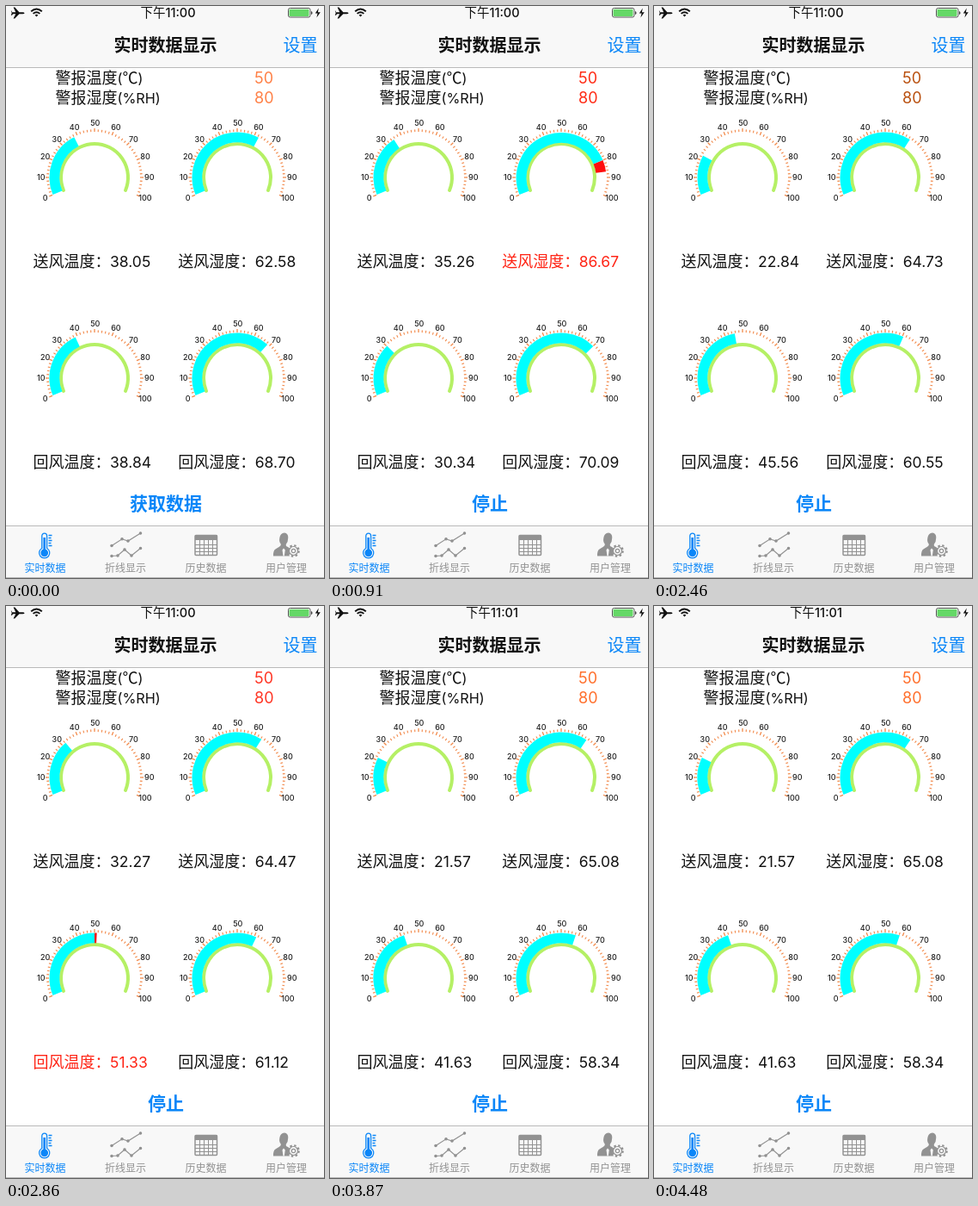
An HTML page for the animation above (4880 ms loop, 370 px wide and 664 px high).

```html
<!DOCTYPE html>
<html lang="zh-CN">
<head>
<meta charset="utf-8">
<title>实时数据显示</title>
<style>
  html, body { margin: 0; width: 100%; height: 100%; overflow: hidden; background: #fff; }
  svg { display: block; width: 370px; height: 664px; }
  text { font-family: Inter, "Noto Sans CJK SC", "Noto Sans CJK", sans-serif; fill: #111; }
  .body { font-size: 18px; }
  .num { font-size: 17.5px; }
  .unit { font-size: 16.2px; }
  .cjk { font-family: "Noto Sans CJK SC", "Noto Sans CJK", sans-serif; }
  .mid { text-anchor: middle; }
  .mark { font-size: 9px; font-weight: 500; fill: #222; text-anchor: middle; }
  .tab { font-size: 12px; fill: #929292; text-anchor: middle; }
  .blue { fill: #0a86f8; }
  .line { fill: none; stroke: #929292; }
</style>
</head>
<body>
<svg id="stage" viewBox="0 0 370 664">
  <rect width="370" height="664" fill="#fff"/>
  <rect width="370" height="71" fill="#f8f8f8"/>
  <rect y="604" width="370" height="60" fill="#f8f8f8"/>
  <path d="M0 71.5H370M0 603.5H370M0 663.5H370" stroke="#bababa"/>

  <!-- status bar -->
  <path d="M6.500 7.200h4.800L8.600 1.500h1.700l5.100 5.700h4q2 .1 2.200 1-.2.9-2.200 1h-4l-5.100 5.300H8.600l2.700-5.300H8.200l-1.300 1.600H5.800l.9-2.600-.9-2.500h1.100z" fill="#111"/>
  <g fill="none" stroke="#111" stroke-width="1.900">
    <path d="M29.200 6.200q6.300-5.600 12.600 0M31.600 8.900q3.900-3.500 7.800 0"/>
    <path d="M33.600 10.400q1.900-1.400 3.800 0L35.500 12.600z" fill="#111" stroke="none"/>
  </g>
  <text id="clock" class="mid" x="188.500" y="13" font-size="14.500" font-weight="500"></text>
  <rect x="328.500" y="2.500" width="25.500" height="10.500" rx="2" fill="#fff" stroke="#555"/>
  <rect x="329.500" y="3.700" width="23" height="8.200" rx="1" fill="#65d867"/>
  <path d="M355 6v4q1.600-.5 1.600-2T355 6z" fill="#444"/>
  <path d="M363.800 2.500l-4 6h2.800l-1.200 5 4.400-6.300h-2.900z" fill="#111"/>

  <text class="mid" x="185.500" y="53" font-size="20" font-weight="700">实时数据显示</text>
  <text class="blue mid" x="342.500" y="52.500" font-size="20">设置</text>

  <!-- alarm limits -->
  <text class="body" x="57.500" y="90">警报温度<tspan class="unit">(</tspan><tspan class="cjk">℃</tspan><tspan class="unit">)</tspan></text>
  <text class="body" x="57.500" y="113">警报湿度<tspan class="unit">(%RH)</tspan></text>
  <g id="limits">
    <text class="body" x="289" y="90">50</text>
    <text class="body" x="289" y="113">80</text>
  </g>

  <g id="gauges"></g>
  <text id="button" class="blue mid" x="186" y="584.500" font-size="21" font-weight="700"></text>

  <!-- tab icons -->
  <g fill="none" stroke="#0a86f8" stroke-width="1.300">
    <path d="M41.800 629.500v-14.500a2.900 2.900 0 0 1 5.800 0v14.500a6.100 6.100 0 1 1-5.800 0z"/>
    <path d="M44.700 617v16" stroke-width="2.600"/>
    <circle cx="44.700" cy="634.800" r="3.700" fill="#0a86f8"/>
    <path d="M49.500 614.500h4M49.500 617.500h3M49.500 620.500h4M49.500 623.500h3M49.500 626.500h4"/>
  </g>
  <g id="chart" class="line" stroke-width="1.200"></g>
  <rect class="line" x="220" y="614.500" width="25.500" height="23" rx="1" stroke-width="1.500"/>
  <rect x="220" y="614" width="25.500" height="6" fill="#929292"/>
  <path class="line" d="M220 625.500h25M220 629.500h25M220 633.500h25M225.500 620v17M230.500 620v17M235.500 620v17M240.500 620v17"/>
  <g fill="#929292">
    <path d="M324 611.500q4.300.6 4.300 5.500 0 5-2.600 8l.3 2q2.500 1 4.500 3-3 4-.5 8.500H311q-.2-6.500 2.500-8l4.500-2.700q2.300-1.500 1.800-3.300-2.300-2.500-1.500-7 .8-5.500 5.700-6z"/>
    <path d="M323 629.500l-1.500 2 1 7h1.300l1-7z" fill="#f8f8f8"/>
  </g>
  <g class="line" stroke-width="1.200">
    <circle cx="334.500" cy="632.500" r="5" fill="#f8f8f8"/>
    <circle cx="334.500" cy="632.500" r="6.300" stroke-width="2" stroke-dasharray="2.470"/>
    <circle cx="334.500" cy="632.500" r="2.200"/>
  </g>
  <text class="tab blue" x="45.500" y="657">实时数据</text>
  <text class="tab" x="139" y="657">折线显示</text>
  <text class="tab" x="232.500" y="657">历史数据</text>
  <text class="tab" x="326" y="657">用户管理</text>
</svg>
<script>
const LOOP = 4880;
const RED = '#ff2213';

// start time, readings (supply °C, supply RH, return °C, return RH), limit colour, clock
const STEPS = [
  [0,    ['38.05', '62.58', '38.84', '68.70'], '#ff8046', '11:00'],
  [910,  ['35.26', '86.67', '30.34', '70.09'], '#ff2a14', '11:00'],
  [1850, ['22.84', '64.73', '45.56', '60.55'], '#b9500f', '11:00'],
  [2860, ['32.27', '64.47', '51.33', '61.12'], '#ff3524', '11:00'],
  [3870, ['21.57', '65.08', '41.63', '58.34'], '#ff6f2c', '11:01'],
];

// name, centre x and y, label x, alarm limit
const GAUGES = [
  ['送风温度', 103, 199, 31.5, 50], ['送风湿度', 269, 199, 200.2, 80],
  ['回风温度', 103, 432, 31.5, 50], ['回风湿度', 269, 432, 200.2, 80],
];

const byId = id => document.getElementById(id);

function add(parent, tag, attrs, text = '') {
  const el = document.createElementNS('http://www.w3.org/2000/svg', tag);
  for (const key in attrs) el.setAttribute(key, attrs[key]);
  el.textContent = text;
  return parent.appendChild(el);
}

// A 0..100 dial spans 225 degrees, with 50 at the top.
function point(value, radius) {
  const a = (202.5 - 2.25 * value) * Math.PI / 180;
  return [(radius * Math.cos(a)).toFixed(2), (-radius * Math.sin(a)).toFixed(2)];
}

function arc(from, to, radius) {
  if (to <= from) return '';
  const large = to - from > 80 ? 1 : 0;
  return `M${point(from, radius)}A${radius} ${radius} 0 ${large} 1 ${point(to, radius)}`;
}

function makeGauge([name, x, y, labelX, limit]) {
  const root = byId('gauges');
  const dial = add(root, 'g', { transform: `translate(${x} ${y})`, fill: 'none' });
  for (let v = 0; v <= 100; v += 2) {
    const major = v % 10 === 0;
    add(dial, 'path', {
      d: `M${point(v, 53)}L${point(v, major ? 57 : 55.8)}`,
      stroke: '#f28a4b', 'stroke-width': major ? 1.3 : 1.1,
    });
  }
  for (let v = 0; v <= 100; v += 10) {
    const [px, py] = point(v, 63);
    add(dial, 'text', { class: 'mark', x: +px + 0.8, y: +py + 3.3 }, v);
  }
  add(dial, 'path', { d: arc(0, 100, 39), stroke: '#b5f065', 'stroke-width': 4, 'stroke-linecap': 'round' });
  const fill = add(dial, 'path', { stroke: '#00ffff', 'stroke-width': 11.8 });
  const over = add(dial, 'path', { stroke: '#ff0d0d', 'stroke-width': 11.8 });
  const label = add(root, 'text', { class: 'body', x: labelX, y: y + 103.5 }, name + '：');
  const number = add(root, 'text', { class: 'num', x: labelX + 89.5, y: y + 103.5 });

  return reading => {
    const value = +reading;
    fill.setAttribute('d', arc(0, Math.min(value, limit), 46.6));
    over.setAttribute('d', arc(limit, value, 46.6));
    number.textContent = reading;
    label.style.fill = number.style.fill = value > limit ? RED : '';
  };
}

function makeChart() {
  const lines = [
    [[123, 626.5], [135, 618.8], [142, 621], [156.5, 612]],
    [[123, 638.5], [130, 638], [138, 631], [146, 638], [156.5, 629.5]],
  ];
  for (const points of lines) {
    add(byId('chart'), 'polyline', { points: points.join(' ') });
    for (const [cx, cy] of points) add(byId('chart'), 'circle', { cx, cy, r: 1.2, fill: '#929292' });
  }
}

const setGauge = GAUGES.map(makeGauge);
makeChart();

function show(index) {
  const [, readings, limitColor, clock] = STEPS[index];
  readings.forEach((reading, i) => setGauge[i](reading));
  for (const el of byId('limits').children) el.style.fill = limitColor;
  byId('clock').textContent = '下午' + clock;
  byId('button').textContent = index ? '停止' : '获取数据';
}

const start = performance.now();
let current = -1;

function tick() {
  const t = (performance.now() - start) % LOOP;
  const index = STEPS.filter(step => step[0] <= t).length - 1;
  if (index !== current) show(current = index);
  requestAnimationFrame(tick);
}
tick();
</script>
</body>
</html>
```
